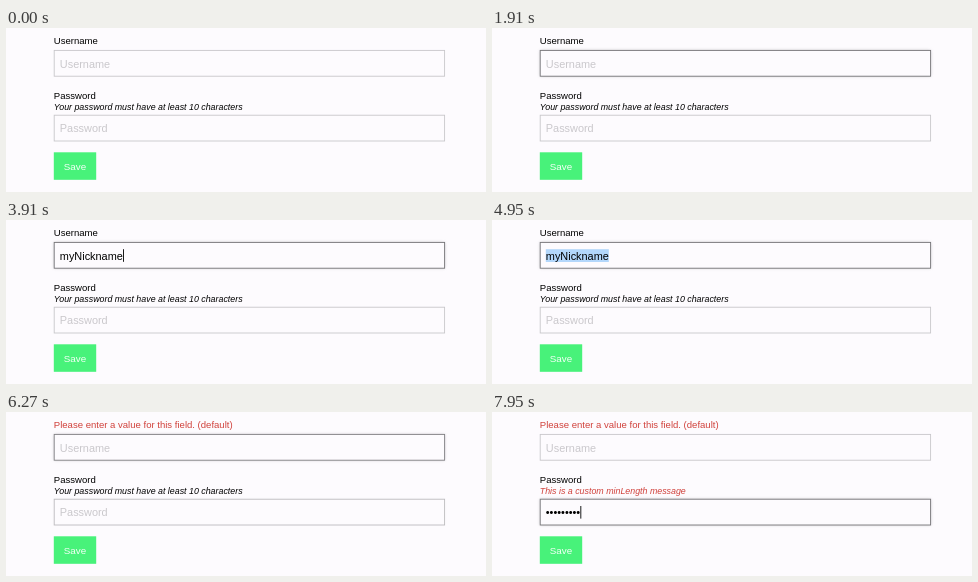
Animation, 480 px wide and 164 px high, one loop 8000 ms. Source, as an HTML page:

```html
<!DOCTYPE html>
<html lang="en">
<head>
<meta charset="utf-8">
<title>Form validation</title>
<style>
  html, body { margin: 0; width: 100%; height: 100%; overflow: hidden; background: #fdfbfe; }
  svg { display: block; width: 480px; height: 164px; }
  text { font-family: "Liberation Sans", Arial, Helvetica, sans-serif; white-space: pre; }
  .label { font-size: 9.55px; }
  .hint { font-size: 8.86px; font-style: italic; }
  .value { font-size: 10.91px; }
  .placeholder { font-size: 10.91px; fill: #cac8cc; }
  .save { font-size: 9.82px; fill: #f4fff7; }
  .error { fill: #d0413b; }
  .box { fill: #fdfbfe; stroke-width: .9; }
  .glow { fill: #aaa8ac; filter: blur(1.5px); }
  .caret { fill: #000; }
  .selection { fill: #b3d7fb; }
</style>
</head>
<body>
<svg viewBox="0 0 480 164">
  <text class="label" id="nameLabel" x="47.8" y="16.4"></text>
  <g id="nameField"></g>
  <text class="label" x="47.8" y="71.2">Password</text>
  <text class="hint" id="hint" x="47.8" y="82"></text>
  <g id="passField"></g>
  <rect x="47.8" y="124.3" width="42.4" height="27.5" fill="#48f27a"/>
  <text class="save" x="57.8" y="141.5">Save</text>
</svg>
<script>
const LOOP = 8000;
const TEXT_X = 53.8;
const NAME = "myNickname";
const NAME_KEYS = [2360, 2500, 2820, 2950, 3090, 3180, 3640, 3730, 3820, 3910];
const PASS_KEYS = [6950, 7320, 7370, 7410, 7500, 7640, 7730, 7860, 7950];
const SELECT_START = 4550, SELECT_STEP = 40, CLEARED = 5000;
const NAME_CARET = [[1410, 1910], [2360, 4410], [5000, 5500], [6000, 6230]];
const PASS_CARET = [[6410, LOOP]];

const byId = id => document.getElementById(id);
const clamp = v => Math.min(1, Math.max(0, v));
const ease = v => { v = clamp(v); return v * v * (3 - 2 * v); };
const within = (t, spans) => spans.some(([from, to]) => t >= from && t < to);
const typed = (t, keys) => keys.filter(k => t >= k).length;

function add(parent, tag, attrs) {
  const node = document.createElementNS("http://www.w3.org/2000/svg", tag);
  for (const key in attrs) node.setAttribute(key, attrs[key]);
  return parent.appendChild(node);
}

function createField(group, top, hintText) {
  const frame = { x: 48.2, y: top, width: 390.4, height: 25.8 };
  const baseline = top + 17.2;
  const glow = add(group, "rect", { ...frame, class: "glow" });
  const box = add(group, "rect", { ...frame, class: "box" });
  const selection = add(group, "rect", { class: "selection", y: top + 6.8, height: 12.8 });
  const placeholder = add(group, "text", { class: "placeholder", x: TEXT_X, y: baseline });
  const value = add(group, "text", { class: "value", x: TEXT_X, y: baseline });
  const caret = add(group, "rect", { class: "caret", y: top + 6.8, width: .9, height: 12.6 });
  placeholder.textContent = hintText;

  const widthOf = count => count ? value.getSubStringLength(0, count) : 0;

  return ({ text, border, shadow, caretOn, selected = 0 }) => {
    value.textContent = text;
    placeholder.style.display = text ? "none" : "";
    const shade = Math.round(200 - 82 * border);
    box.style.stroke = `rgb(${shade},${shade - 1},${shade + 2})`;
    glow.style.opacity = shadow * .7;
    const end = widthOf(text.length);
    const start = widthOf(text.length - selected);
    selection.setAttribute("x", TEXT_X + start);
    selection.setAttribute("width", end - start);
    caret.setAttribute("x", TEXT_X + end + .2);
    caret.style.display = caretOn ? "" : "none";
  };
}

const drawName = createField(byId("nameField"), 22.4, "Username");
const drawPass = createField(byId("passField"), 87.2, "Password");

function setMessage(id, error, normalText, errorText) {
  const node = byId(id);
  node.textContent = error ? errorText : normalText;
  node.classList.toggle("error", error);
}

function focusState(t, start, end = Infinity) {
  const fade = duration => ease((t - start) / duration) - ease((t - end) / duration);
  return { border: fade(250), shadow: fade(420) };
}

function render(t) {
  const cleared = t >= CLEARED;
  const count = cleared ? 0 : typed(t, NAME_KEYS);
  const selected = cleared || t < SELECT_START ? 0
    : Math.min(NAME.length, 1 + Math.floor((t - SELECT_START) / SELECT_STEP));

  setMessage("nameLabel", cleared, "Username", "Please enter a value for this field. (default)");
  setMessage("hint", t >= PASS_KEYS[0],
    "Your password must have at least 10 characters", "This is a custom minLength message");

  drawName({
    text: NAME.slice(0, count), selected,
    caretOn: within(t, NAME_CARET), ...focusState(t, 1280, 6210)
  });
  drawPass({
    text: "•".repeat(typed(t, PASS_KEYS)),
    caretOn: within(t, PASS_CARET), ...focusState(t, 6210)
  });
}

const startTime = performance.now();
function tick() {
  render((performance.now() - startTime) % LOOP);
  requestAnimationFrame(tick);
}
tick();
</script>
</body>
</html>
```
